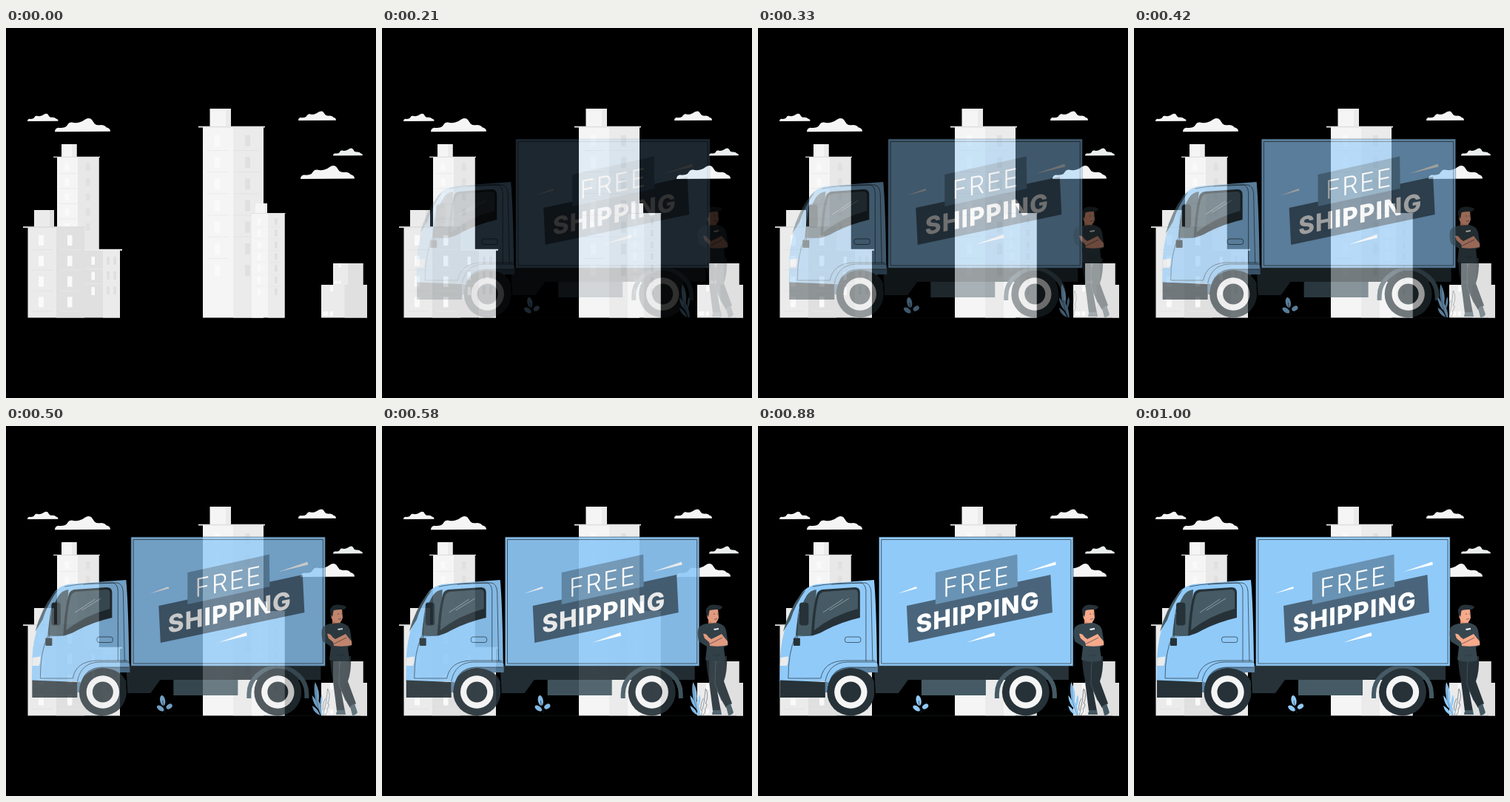
These frames come from a looping animation (500 px wide and 500 px high, 1040 ms). An HTML page:

```html
<!DOCTYPE html>
<html lang="en">
<head>
<meta charset="utf-8">
<title>Free shipping</title>
<style>
  html, body { margin: 0; width: 100%; height: 100%; overflow: hidden; background: #000; }
  svg { display: block; width: 100vw; height: 100vh; }
  text { font-family: Inter, "Open Sans", sans-serif; fill: #fff; }
  .line { fill: none; stroke: #263238; stroke-width: .7; }
</style>
</head>
<body>
<svg viewBox="0 0 500 500">
  <defs>
    <path id="cloud" d="M0 18Q0 13 5 12.500Q9 13 13 12Q16 11 17.500 8Q19 5 23 5.500Q28 7 33 5.500Q38 4 41 1.500Q47-1.500 50 2Q52 5 54 7.500Q57 9.500 62 8.800Q68 9 69.500 12Q75 13 75 17.500Z"/>
    <g id="wheel">
      <circle r="32" fill="#263238"/>
      <circle r="22.200" fill="#f5f5f5"/>
      <circle r="14" fill="#263238"/>
    </g>
  </defs>

  <g id="city"></g>

  <path id="ground" class="line" d="M31 391.500H479" stroke-opacity=".5"/>

  <g id="truck">
    <!-- chassis -->
    <path d="M158 324H421V343H204L191 361H160Z" fill="#263238"/>
    <path d="M222 343H309V364H222Z" fill="#455a64"/>
    <path d="M92 345Q96 322 122 321H163V333H150V360H92Z" fill="#5c83a3"/>
    <path d="M95 360Q95 330 126 327Q150 328 158 345V360Z" fill="#263238"/>
    <path d="M324 368V362A39 36 0 0 1 402 362V368" fill="none" stroke="#455a64" stroke-width="6"/>

    <!-- cargo box -->
    <path d="M164.600 150H427V324.300H164.600Z" fill="#90caf9" stroke="#263238" stroke-width=".6"/>
    <path class="line" d="M167.800 153.500H424V321H167.800Z"/>
    <path d="M202 243L396.500 201L399 252L204.500 293Z" fill="#4a657b"/>
    <path d="M241 198L351.500 173.500L352 217L241 241Z" fill="#6993b4"/>
    <g fill="#fff">
      <path d="M190 226.500L215 217L216 219.500Z"/>
      <path d="M364 197L403 183.500L404 187.500Z"/>
      <path d="M283 292.500L320.500 279L321.500 283.500Z"/>
    </g>
    <text transform="translate(251 231.500) skewY(-11.300)" font-size="34.500" font-weight="300" letter-spacing="2">FREE</text>
    <text transform="translate(214.500 280) skewY(-11.300)" font-size="33" font-weight="800" letter-spacing="1.100">SHIPPING</text>

    <!-- cab -->
    <path d="M158 208Q161 240 162 320H120Q98 321 93 345H30.500L31 314Q32 290 40 266L57 231Q65 215 84 213.500Z" fill="#90caf9"/>
    <path d="M35 278Q43 248 60 226L66 221Q51 242 45 262Z" fill="#455a64"/>
    <path d="M52 283Q54 250 67 229Q72 222 80 221L77 283Z" fill="#455a64"/>
    <path d="M73 283Q75 245 81 226Q83 222 88 221L132 218Q139 218 139 225V259Q113 265 92 276Q82 282 73 283Z" fill="#263238"/>
    <path d="M77 276Q79 242 84 228Q86 225 90 224L131 221Q136 221 136 226V247Q102 256 77 276Z" fill="#455a64"/>
    <path d="M89 252L116 234M98 249L124 233" stroke="#a9b9c1" stroke-width=".7"/>
    <path class="line" d="M75 217Q105 211 146 212Q153 213 154 224L156 318"/>
    <path class="line" d="M100 214L140 212Q146 213 147 222V318M42 341Q42 305 52 284L75 283M42 341H86Q90 318 118 317H160"/>
    <rect class="line" x="118.500" y="285" width="21.500" height="7.500" rx="3"/>
    <path class="line" d="M59 243Q54 250 54 288"/>
    <rect x="57" y="238.500" width="12.500" height="31" rx="4" fill="#263238"/>
    <rect x="49" y="286.500" width="9" height="10.500" rx="1" fill="#263238"/>
    <path d="M31.500 313L42 311.500Q42 320 40 324H31Z" fill="#ebebeb"/>
    <path d="M31 343.500L92 346V367H31Z" fill="#263238"/>
    <path d="M92 345Q97 320 121 319H162V326H124Q103 327 97 347Z" fill="#90caf9"/>
    <path class="line" d="M92 345Q97 320 121 319H162M97 347Q103 327 124 326H162"/>

    <use href="#wheel" x="126.500" y="359.500"/>
    <use href="#wheel" x="363" y="359.500"/>
  </g>

  <g id="plants" fill="#90caf9">
    <ellipse cx="216" cy="371" rx="3.500" ry="7" transform="rotate(-10 216 371)"/>
    <ellipse cx="213" cy="381.500" rx="5.500" ry="3" transform="rotate(35 213 381.500)"/>
    <ellipse cx="225" cy="379" rx="4.500" ry="3" transform="rotate(-35 225 379)"/>
    <path class="line" d="M216 371Q217 382 220 388"/>
    <path d="M430 391Q418 365 422 346Q429 358 427 372Q432 381 432 391Z"/>
    <path d="M427 383Q419 376 418 364Q424 369 427 383ZM429 391Q420 388 418 378Q425 381 429 391ZM429 380Q428 370 431 363Q434 371 429 380Z"/>
    <path class="line" d="M423 350Q422 374 430 391" stroke-opacity=".5"/>
    <path class="line" d="M433 391Q438 372 439 355Q444 363 439 375Q443 375 438 383Q440 386 435 391M433 385Q431 377 436 368" stroke-opacity=".7"/>
  </g>

  <g id="person">
    <path d="M438 311H466Q467 331 462 345L473 375L465 381Q458 370 453 358L458 385H447L442 345Q438 325 438 311Z" fill="#263238"/>
    <path d="M451 319Q450 335 450 349L459 371" fill="none" stroke="#455a64" stroke-width=".8"/>
    <path d="M448 384H458L459 390H446Q446 387 448 384ZM465 379L471 375L475 387Q473 391 468 391Z" fill="#455a64"/>
    <path d="M441 260H452V270H441Z" fill="#e58e6f"/>
    <path d="M439 267L453 266Q463 268 465 276L468 296L462 299L464 317Q451 321 437 316L439 298L428 291Q425 279 428 272Q432 268 439 267Z" fill="#37474f"/>
    <path d="M440 247H454L455 259Q453 267 447 266Q440 264 439 256Z" fill="#f7a98b"/>
    <path d="M438 247H443L441 258Q437 254 438 247Z" fill="#263238"/>
    <path d="M438 251Q438 242 447 241.500Q455 241 460 244Q459 249 452 248Q444 248 438 251Z" fill="#263238"/>
    <path d="M448 254H450M453 254H454M449 261Q451 262 453 260" fill="none" stroke="#263238" stroke-width=".6"/>
    <path d="M434 281Q438 280 441 285L445 288L459 281L462 285L467 291L467 296Q457 299 443 297L442 292L436 287Z" fill="#f7a98b"/>
    <path d="M442 295L460 286M447 309Q452 312 457 309" fill="none" stroke="#263238" stroke-width=".6"/>
    <path d="M448 274L455 273V275L449 276Z" fill="#fff"/>
  </g>
</svg>
<script>
const CYCLE = 1040, STEPS = 24, SLIDE = 20;
const byId = id => document.getElementById(id);

const rect = (x, y, right, bottom, fill) =>
  `<rect x="${x}" y="${y}" width="${right - x}" height="${bottom - y}" fill="${fill}"/>`;

// Two-tone block, split at x = mid
const block = (x, mid, right, y, bottom, left, shade) =>
  rect(x, y, right, bottom, left) + rect(mid, y, right, bottom, shade);

function rows(count, y, gap, draw) {
  return Array.from({ length: count }, (_, i) => draw(y + i * gap)).join('');
}

const windows = (x, width, y, height, gap, count, fill) =>
  rows(count, y, gap, top => rect(x, top, x + width, top + height, fill));

const floors = (x, right, y, gap, count, fill) =>
  rows(count, y, gap, top => rect(x, top, right, top + .8, fill));

const cloud = (x, y, width, height, fill = '#f5f5f5') =>
  `<use href="#cloud" transform="translate(${x} ${y}) scale(${width / 75} ${height / 18})" fill="${fill}"/>`;

const LIGHT = '#f5f5f5', MID = '#ebebeb', DARK = '#e0e0e0', WHITE = '#fafafa';

byId('city').innerHTML = [
  cloud(29, 115.7, 41.5, 10.3), cloud(66, 122, 75, 18.3),
  cloud(395, 112.3, 51, 12.7), cloud(442, 162.5, 40, 10, '#ebeeee'), cloud(398, 186, 73, 18),

  // left tower
  block(75, 89, 95.5, 157, 174, LIGHT, MID),
  block(69, 97, 125.5, 174, 300, LIGHT, '#e8e8e8'),
  rect(64, 173.8, 127, 175, '#dedede'),
  floors(71, 123, 196, 20.5, 5, '#e9e9e9'),
  windows(79.5, 6, 183, 10, 20.2, 5, WHITE),
  windows(108, 5.5, 183, 10, 20.2, 5, DARK),

  // left annex
  block(106, 131, 154, 300, 391.5, DARK, MID),
  rect(106, 298.8, 157, 300.8, MID),
  floors(107, 130, 325, 20, 2, MID),
  windows(115.5, 4.5, 309, 11, 20.5, 3, WHITE),
  windows(136, 4, 309, 11, 20, 3, DARK),
  windows(145, 4, 309, 11, 20, 3, DARK),

  // left front
  block(38, 59, 65, 246, 269, MID, DARK),
  block(29.5, 68, 106, 269, 391.5, MID, DARK),
  rect(23, 268.2, 107, 270, '#dedede'),
  floors(35, 63, 299, 27.8, 4, DARK),
  floors(73, 101, 299, 27.8, 4, '#e8e8e8'),
  windows(44, 7, 280, 14, 27.8, 4, WHITE),
  windows(83, 6.5, 280, 14, 27.8, 4, WHITE),

  // right tower
  block(275.5, 297, 304, 109, 133, LIGHT, MID),
  block(266, 307, 348, 134, 391.5, LIGHT, MID),
  rect(260, 132.7, 350, 134.5, '#e2e2e2'),
  floors(271, 301, 165, 29.2, 6, '#e8e8e8'),
  floors(307, 342, 165, 29.2, 5, '#e2e2e2'),
  windows(282, 7, 145, 15, 29.2, 7, WHITE),
  windows(323, 7, 145, 15, 29.2, 7, DARK),

  // right front
  block(337, 350, 353, 237, 251, LIGHT, MID),
  block(332, 354, 376.5, 250.5, 391.5, LIGHT, MID),
  rect(331, 250, 377.5, 251, DARK),
  floors(335, 352, 268.5, 16, 6, '#ededed'),
  floors(357, 374, 268.5, 16, 6, '#e4e4e4'),
  windows(340, 4, 257, 9, 15.8, 7, WHITE),
  windows(363, 4, 257, 9, 15.8, 7, DARK),

  // parcels
  block(442, 462, 482.5, 318, 347, MID, DARK),
  block(426, 457.5, 488, 347, 391.5, MID, DARK),
  rect(449, 318, 453, 323, WHITE), rect(444, 341.5, 448, 345.5, WHITE),
  rect(449, 341.5, 452.5, 345.5, WHITE), rect(438, 348, 442, 356, WHITE),
  rect(428, 383, 435.5, 389, WHITE), rect(437.5, 383, 442, 389, WHITE)
].join('');

const cubic = (a, b, u) => 3 * (1 - u) ** 2 * u * a + 3 * (1 - u) * u * u * b + u ** 3;

// cubic-bezier(.36, -.01, .5, 1.38): overshoots, then settles
function ease(x) {
  let low = 0, high = 1;
  for (let i = 0; i < 24; i++) {
    const u = (low + high) / 2;
    if (cubic(.36, .5, u) < x) low = u; else high = u;
  }
  return cubic(-.01, 1.38, (low + high) / 2);
}

function render(ms) {
  const step = Math.floor((ms % CYCLE + 7) / 1000 * STEPS);
  const progress = step < 2 ? 0 : ease(Math.min(1, (step + .5) / STEPS));
  const offset = SLIDE * (1 - progress);
  const opacity = Math.max(0, Math.min(1, progress));
  for (const id of ['truck', 'plants', 'person', 'ground']) byId(id).setAttribute('opacity', opacity);
  byId('truck').setAttribute('transform', `translate(${offset} 0)`);
  byId('plants').setAttribute('transform', `translate(${-offset} 0)`);
}

const start = performance.now();
function tick() {
  render(performance.now() - start);
  requestAnimationFrame(tick);
}
tick();
</script>
</body>
</html>
```
